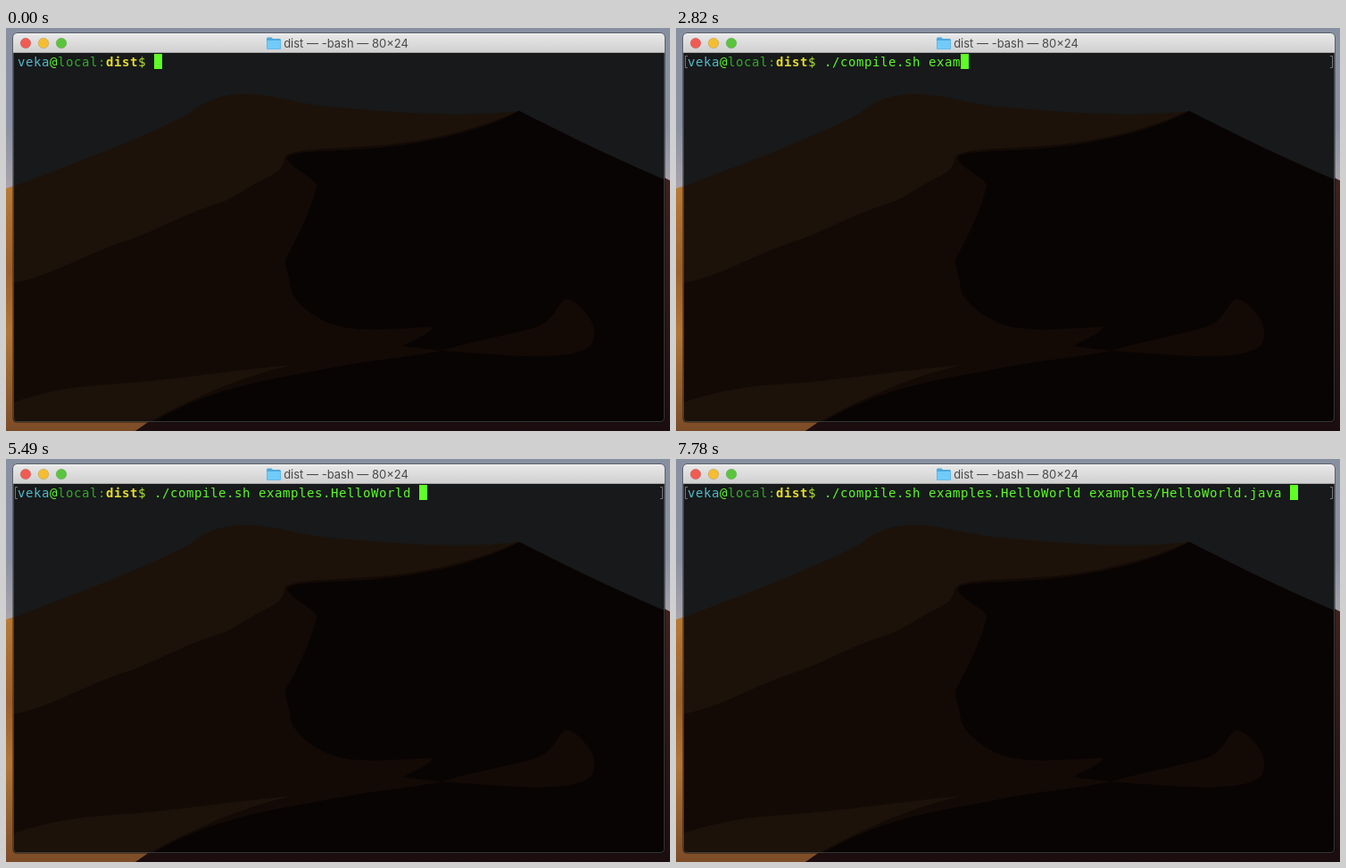
Animation, 744 px wide and 452 px high, one loop 8 s. Source, as an HTML page:

```html
<!DOCTYPE html>
<html lang="en">
<head>
<meta charset="utf-8">
<title>Terminal</title>
<style>
  html, body { margin: 0; width: 100%; height: 100%; overflow: hidden; background: #140b0c; }
  svg { display: block; width: 744px; height: 452px; }
  .title { font: 13px Inter, sans-serif; fill: #484848; text-anchor: middle; }
  .line {
    font: 14px "DejaVu Sans Mono", monospace;
    letter-spacing: calc(9px - 1ch);
    white-space: pre;
    fill: #5cfa28;
  }
  .user { fill: #52b9cc; }
  .host { fill: #35a82a; }
  .dir { fill: #e4dc2c; font-weight: bold; }
  .sign { fill: #b4ea28; }
  .marks { fill: none; stroke: #777; }
</style>
</head>
<body>
<svg viewBox="0 0 744 452">
  <defs>
    <linearGradient id="sky" x2="0" y2="1">
      <stop offset="0" stop-color="#8790a0"/>
      <stop offset=".6" stop-color="#8a91a3"/>
      <stop offset="1" stop-color="#a9a3ac"/>
    </linearGradient>
    <linearGradient id="sand" x2="0" y2="1">
      <stop offset="0" stop-color="#b87a34"/>
      <stop offset=".35" stop-color="#9c602c"/>
      <stop offset=".6" stop-color="#b27636"/>
      <stop offset="1" stop-color="#7c4c28"/>
    </linearGradient>
    <linearGradient id="shade" x2="0" y2="1">
      <stop offset="0" stop-color="#40211d"/>
      <stop offset="1" stop-color="#1b0d0f"/>
    </linearGradient>
    <linearGradient id="bar" x2="0" y2="1">
      <stop offset="0" stop-color="#e9e9e9"/>
      <stop offset="1" stop-color="#cfcfcf"/>
    </linearGradient>
    <clipPath id="pane"><path d="M8 28H738V437Q738 442 733 442H13Q8 442 8 437Z"/></clipPath>
  </defs>

  <!-- desktop -->
  <rect width="744" height="180" fill="url(#sky)"/>
  <path d="M0 180L12 176V440H165L145 452H0Z" fill="url(#sand)"/>
  <path d="M732 165L744 171V452H145L165 438H732Z" fill="url(#shade)"/>
  <rect x="7" y="5" width="732" height="438" rx="6" fill="#000" opacity=".35"/>

  <!-- window -->
  <g clip-path="url(#pane)">
    <rect x="8" y="28" width="730" height="414" fill="#17191a"/>
    <path fill="#1c120a" d="M8 178C80 150 150 125 205 96C225 80 245 74 268 74C300 74 330 86 370 89C430 94 510 101 575 93L600 442H8Z"/>
    <path fill="#130a06" d="M575 93C520 117 460 130 400 133C350 136 315 136 312 146C311 157 306 161 290 169C270 179 255 191 240 196C200 208 170 226 140 237C90 252 50 279 8 286V442H600Z"/>
    <path fill="#1c120a" d="M8 420C40 409 70 403 110 400C180 396 250 384 320 378C270 389 215 412 160 442H8Z"/>
    <path fill="#080403" d="M575 93C610 110 650 132 738 170V442H165C225 405 290 395 350 384C400 373 440 371 488 362L445 357C455 350 473 345 479 335C440 337 405 341 375 335C350 329 325 311 319 293C318 278 312 268 313 259C322 244 342 205 348 177C347 168 318 157 315 146C318 138 350 139 400 136C460 132 530 118 575 93Z"/>
    <path fill="#130a06" d="M488 362C520 352 555 346 585 338C612 332 612 320 624 306C630 301 640 308 649 319C660 331 662 346 655 356C640 370 595 369 560 367Z"/>
  </g>
  <path d="M8.5 28V437Q8.5 441.5 13 441.5H733Q737.5 441.5 737.5 437V28" fill="none" stroke="#8c9a9a" stroke-opacity=".35"/>
  <path d="M8 28V11Q8 6 13 6H733Q738 6 738 11V28Z" fill="url(#bar)"/>
  <path d="M12 6.5H734" stroke="#f4f4f4"/>
  <path d="M8 27.5H738" stroke="#a9a9a9"/>
  <g stroke-opacity=".12" stroke="#000">
    <circle cx="22" cy="17" r="5.8" fill="#f15b52"/>
    <circle cx="42" cy="17" r="5.8" fill="#f6bd30"/>
    <circle cx="62" cy="17" r="5.8" fill="#5ac43c"/>
  </g>
  <path d="M292 12Q292 10.500 293.500 10.500H297.500L299 12H306.500Q308 12 308 13.500V22.500Q308 24 306.500 24H293.500Q292 24 292 22.500Z" fill="#4fa9dc"/>
  <path d="M292.500 14H307.500V22.500Q307.500 23.500 306.500 23.500H293.500Q292.500 23.500 292.500 22.500Z" fill="#70cbfa"/>
  <text class="title" x="381" y="22">dist — -bash — 80×24</text>

  <!-- shell line -->
  <path id="marks" class="marks" d="M13 31.500H10.500V44.500H13M733 31.500H735.500V44.500H733"/>
  <text class="line" x="13" y="43"><tspan class="user">veka</tspan>@<tspan class="host">local:</tspan><tspan class="dir">dist</tspan><tspan class="sign">$</tspan></text>
  <text id="typed" class="line" x="166" y="43"></text>
  <rect id="cursor" x="166" y="29" width="9" height="17" fill="#5fff26"/>
</svg>
<script>
  const LOOP = 8000, CELL = 9, LEFT = 166;
  const command = "./compile.sh examples.HelloWorld examples/HelloWorld.java ";
  const [typed, cursor, marks] = ["typed", "cursor", "marks"].map(id => document.getElementById(id));

  // Key presses add one character; completions jump to a length.
  const keys = [
    1080, 1170, 1260, 1350, 1440, 2370, 2550, 2700, 2820, 2910, 2980, 3050,
    3200, 3290, 3590, 3680, 3800, 3920, 4160, 4420, 4600, 4680, 4830, 4860,
    5490, 5900, 6230, 6380, 6470, 7330, 7450, 7570
  ];
  const tabs = [[1620, 13], [6620, 42], [7780, command.length]];

  function lengthAt(t) {
    const [from, base] = tabs.filter(([at]) => at <= t).pop() || [0, 0];
    return base + keys.filter(k => k > from && k <= t).length;
  }

  function draw(now) {
    const t = now % LOOP, n = lengthAt(t);
    typed.textContent = command.slice(0, n);
    cursor.setAttribute("x", LEFT + n * CELL);
    cursor.style.visibility = t >= 390 && t < 870 ? "hidden" : "visible";
    marks.style.visibility = t >= tabs[0][0] ? "visible" : "hidden";
  }

  const start = performance.now();
  function tick() {
    draw(performance.now() - start);
    requestAnimationFrame(tick);
  }
  tick();
</script>
</body>
</html>
```
